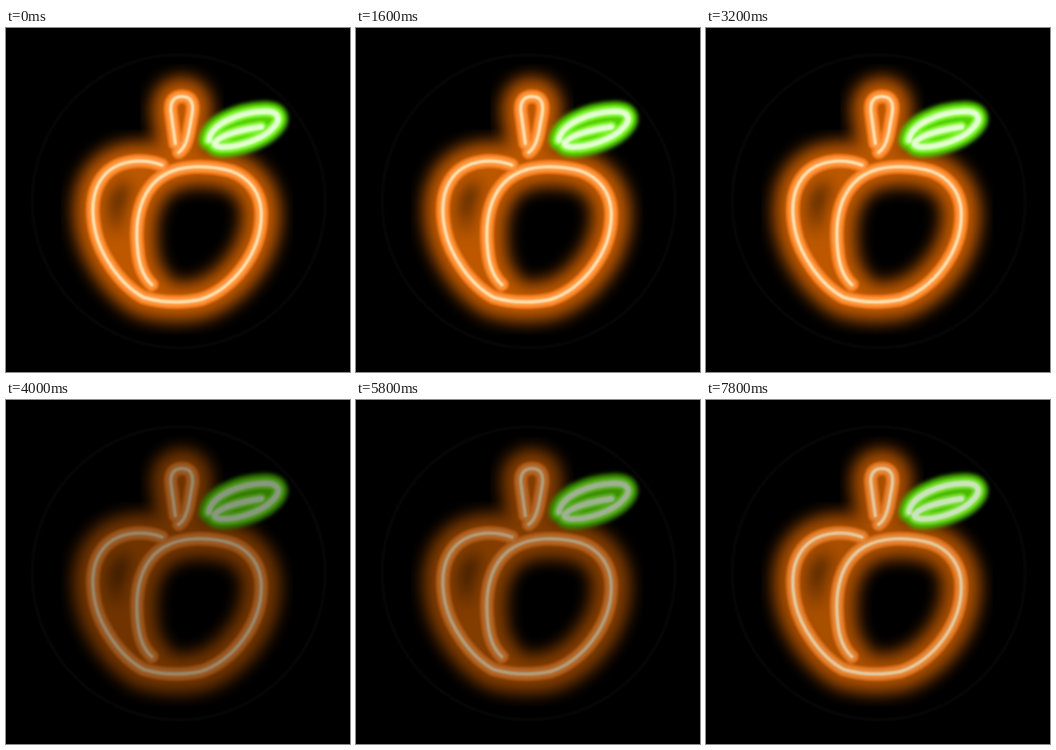
Animation, 512 px wide and 512 px high, one loop 8 s. Source, as an HTML page:

```html
<!DOCTYPE html>
<html lang="en">
<head>
<meta charset="utf-8">
<title>Neon peach</title>
<style>
  html, body { margin: 0; width: 100%; height: 100%; overflow: hidden; background: #000; }
  svg { display: block; width: 100%; height: 100%; }
  path, circle { fill: none; stroke-linecap: round; stroke-linejoin: round; }
  .halo { stroke: #bd5800; stroke-width: 58; }
  .tube { stroke: #f27a1c; stroke-width: 21; filter: url(#soft); }
  .inner { stroke: #ff9840; stroke-width: 14; filter: url(#soft); }
  .core { stroke: #ffdfae; stroke-width: 5; filter: url(#fine); }
  .leaf-halo { stroke: #55cf00; stroke-width: 29; filter: url(#medium); }
  .leaf-tube { stroke: #7cf52c; stroke-width: 17; filter: url(#soft); }
  .leaf-core { stroke: #e2ffd0; stroke-width: 9; filter: url(#soft); }
</style>
</head>
<body>
<svg viewBox="0 0 512 512">
  <defs>
    <path id="body" d="M232 204C205 194 165 195 144 222C127 244 127 275 133 303C140 335 168 381 205 401C235 410 265 409 290 404C337 389 380 335 380 278C380 245 361 222 335 213C300 203 260 204 235 219C200 240 191 285 196 330C198 354 205 371 217 382"/>
    <path id="stem" d="M252 172L246 128C243 110 250 102 262 102C274 102 280 110 277 128L273 150C270 168 265 180 257 185"/>
    <path id="leaf" d="M302 167C305 143 347 125 385 124C405 124 411 134 398 148C382 166 345 178 320 177C311 176 308 173 312 169C322 159 350 151 380 147"/>
    <filter id="bodyGlow" filterUnits="userSpaceOnUse" x="82" y="151" width="345" height="305" color-interpolation-filters="sRGB"><feGaussianBlur stdDeviation="12"/></filter>
    <filter id="stemGlow" filterUnits="userSpaceOnUse" x="200" y="54" width="124" height="180" color-interpolation-filters="sRGB"><feGaussianBlur stdDeviation="12"/></filter>
    <filter id="medium" filterUnits="userSpaceOnUse" x="0" y="0" width="512" height="512" color-interpolation-filters="sRGB"><feGaussianBlur stdDeviation="3"/></filter>
    <filter id="soft" filterUnits="userSpaceOnUse" x="0" y="0" width="512" height="512" color-interpolation-filters="sRGB"><feGaussianBlur stdDeviation="1.7"/></filter>
    <filter id="fine" filterUnits="userSpaceOnUse" x="0" y="0" width="512" height="512" color-interpolation-filters="sRGB"><feGaussianBlur stdDeviation="1.3"/></filter>
  </defs>
  <rect width="512" height="512"/>
  <circle cx="257" cy="258" r="218" stroke="#050505" stroke-width="5"/>
  <g id="neon">
    <use href="#body" class="halo" filter="url(#bodyGlow)"/>
    <use href="#stem" class="halo" filter="url(#stemGlow)"/>
    <g class="tube"><use href="#body"/><use href="#stem"/></g>
    <g class="inner"><use href="#body"/><use href="#stem"/></g>
    <g class="core"><use href="#body"/><use href="#stem"/></g>
    <use href="#leaf" class="leaf-halo"/>
    <use href="#leaf" class="leaf-tube"/>
    <use href="#leaf" class="leaf-core"/>
  </g>
</svg>
<script>
  const STEP = 200, PERIOD = 1600, DEPTH = 0.4;
  const neon = document.getElementById('neon');
  const start = performance.now();

  // Linear dim-and-recover pulse, held for STEP ms per level.
  function draw() {
    const elapsed = (performance.now() - start) % 8000;
    const phase = Math.floor(elapsed / STEP) * STEP % PERIOD / PERIOD;
    neon.style.opacity = 1 - DEPTH * (1 - Math.abs(1 - 2 * phase));
    requestAnimationFrame(draw);
  }
  draw();
</script>
</body>
</html>
```
